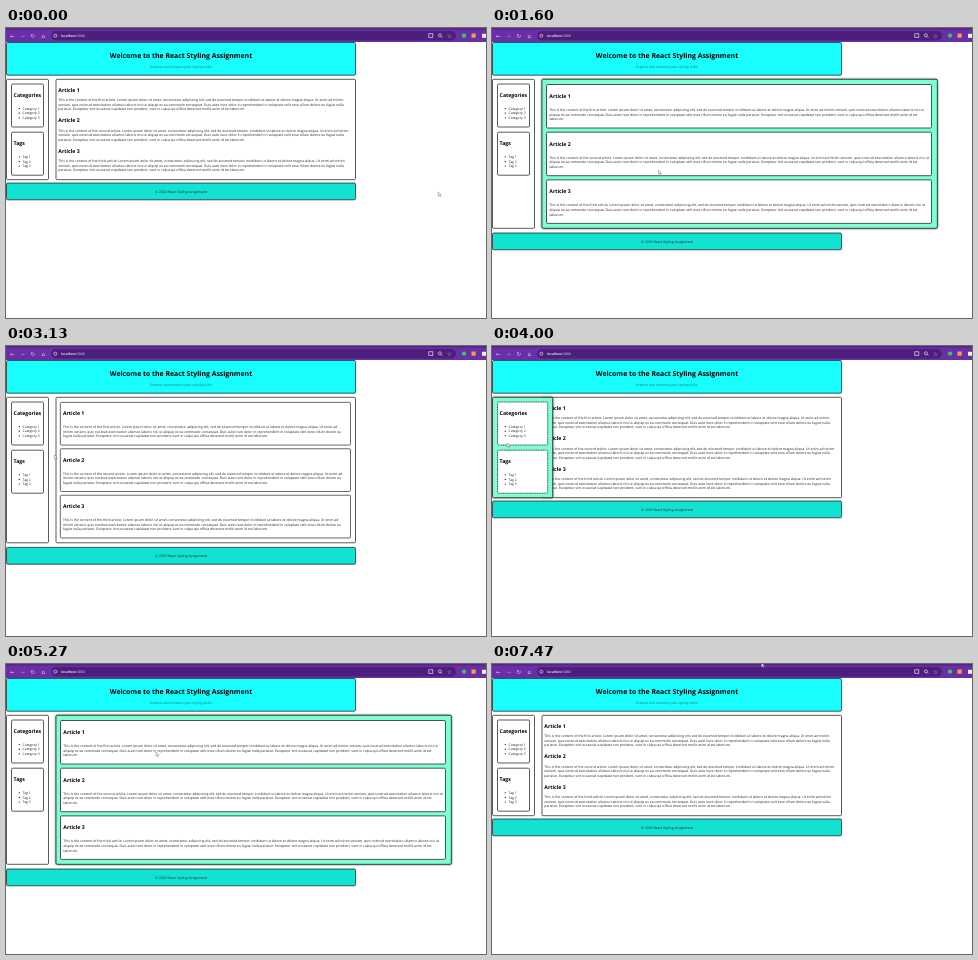
Recreate the animation shown at these times as an HTML page. Size 480 px wide and 290 px high, loop 7540 ms.

```html
<!DOCTYPE html>
<html lang="en">
<head>
<meta charset="utf-8">
<title>React Styling Assignment</title>
<style>
  html, body { margin: 0; width: 100%; height: 100%; overflow: hidden; background: #fff; }
  svg { display: block; width: 480px; height: 290px; }
  text { font: 3.41px "Open Sans", "Noto Sans", sans-serif; fill: #222; text-rendering: geometricPrecision; white-space: pre; }
  .h1 { font-size: 6.9px; font-weight: 700; fill: #000; }
  .h2 { font-size: 5.2px; font-weight: 700; fill: #000; }
  .mid { text-anchor: middle; }
  .icon { font: 5.5px "DejaVu Sans", sans-serif; fill: #e9dcf5; text-anchor: middle; }
  .url { font-weight: 600; fill: #fff; }
  .shadow { filter: drop-shadow(0 0 1px #000a); }
</style>
</head>
<body>
<svg viewBox="0 0 480 290">
  <rect width="480" height="14" fill="#6a2fa6"/>
  <rect width="480" height="1.6" fill="#56258a"/>
  <rect x="45" y="3" width="405" height="9.4" rx="4.7" fill="#4b1f7b"/>
  <text class="icon" x="6.2" y="9.5">←</text>
  <text class="icon" x="16.5" y="9.5" opacity=".5">→</text>
  <text class="icon" x="26.8" y="9.5">↻</text>
  <text class="icon" x="37.2" y="9.5">⌂</text>
  <text class="icon" x="443.5" y="9.5">☆</text>
  <g fill="none" stroke="#e9dcf5" stroke-width=".7">
    <circle cx="49.3" cy="7.7" r="1.5"/>
    <rect x="422.8" y="5.8" width="4" height="3.5"/>
    <path d="M435 8.400l1.300 1.300"/><circle cx="433.900" cy="7.300" r="1.500"/>
  </g>
  <text class="url" x="55" y="9">localhost<tspan fill="#c9b5dc">:3000</tspan></text>
  <circle cx="458" cy="7.600" r="2.200" fill="#35c56c"/>
  <rect x="465.500" y="5.500" width="4.200" height="4.200" fill="#f0a43a"/>
  <rect x="476" y="5.800" width="4" height="4" fill="#f4edfa"/>
  <g id="page"></g>
  <path id="cursor" d="M0 0v4l1-.8.7 1.500.7-.3-.7-1.500h1.300z" fill="#fff" stroke="#444" stroke-width=".35"/>
</svg>
<script>
const LOOP = 7540, COLLAPSE = 280;
const page = document.getElementById('page');
const cursor = document.getElementById('cursor');

const LOREM = 'Lorem ipsum dolor sit amet, consectetur adipiscing elit, sed do eiusmod tempor ' +
  'incididunt ut labore et dolore magna aliqua. Ut enim ad minim veniam, quis nostrud exercitation ' +
  'ullamco laboris nisi ut aliquip ex ea commodo consequat. Duis aute irure dolor in reprehenderit ' +
  'in voluptate velit esse cillum dolore eu fugiat nulla pariatur. Excepteur sint occaecat cupidatat ' +
  'non proident, sunt in culpa qui officia deserunt mollit anim id est laborum.';

// words that start the second and third line at each article width
const BREAKS = { base: ['veniam', 'pariatur'], padded: ['minim', 'fugiat'], wide: ['aliquip', 'laborum'] };

const MAIN_HOVER = [[1070, 3085], [5030, 6650]];
const SIDE_HOVER = [3200, 4580];

// pointer moves: start, end, destination; it rests in between
const HOME = [432.2, 164];
const MOVES = [
  [70, 530, 374, 156], [1000, 1600, 166.5, 142], [2200, 2600, 65, 115], [2930, 3530, 15, 97],
  [4330, 4630, 70, 42], [4630, 5000, 142.5, 51], [5000, 5270, 150, 88],
  [5730, 6130, 222, 140], [6130, 6530, 294, 74], [6530, 6930, 272, 6], [7270, 7470, 269.5, -1]
];

const clamp = v => Math.min(1, Math.max(0, v));
const mix = (a, b, p) => a + (b - a) * p;
const within = (t, [a, b]) => t >= a && t < b;

function pointer(t) {
  let [x, y] = HOME;
  for (const [from, to, nx, ny] of MOVES) {
    const p = clamp((t - from) / (to - from));
    x = mix(x, nx, p);
    y = mix(y, ny, p);
  }
  return [x, y];
}

// 1 while the main column is hovered, easing back to 0 after the pointer leaves
function expansion(t) {
  const last = MAIN_HOVER.filter(h => t >= h[0]).pop();
  if (!last) return 0;
  const q = clamp((t - last[1]) / COLLAPSE);
  return 1 - q * q * (3 - 2 * q);
}

const text = (x, y, s, cls = '') => `<text x="${x}" y="${y}" class="${cls}">${s}</text>`;

function box(x, y, right, bottom, fill = '#fff', extra = '') {
  return `<rect x="${x}" y="${y}" width="${right - x}" height="${bottom - y}" rx="1.2"
    fill="${fill}" stroke="#000" stroke-width=".65" ${extra}/>`;
}

function article(i, p, breaks) {
  const shift = i * mix(30.5, 47.7, p);
  const top = mix(54, 56.5, p) + shift, x = mix(52.3, 57.3, p);
  const right = breaks === BREAKS.wide ? 439.5 : mix(347, 344.3, p);
  const title = mix(63.9, 69.9, p) + shift;
  let body = `This is the content of the ${['first', 'second', 'third'][i]} article. ${LOREM}`;
  for (const word of breaks) body = body.replace(' ' + word, '\n' + word);
  return (p ? box(mix(52, 54.5, p), top, right, top + mix(33, 43.5, p), '#fff', `stroke-opacity="${p}"`) : '') +
    text(x, title, `Article ${i + 1}`, 'h2') +
    body.split('\n').map((s, n) => text(x, title + mix(9.3, 13.1, p) + n * 4.55, s)).join('');
}

function card(y, right, title, item, dash) {
  let out = box(5.5, y, right, y + 43, '#fff', dash) + text(7.6, y + 12.7, title, 'h2');
  for (let n = 0; n < 3; n++) {
    const base = y + 25.7 + n * 4.6;
    out += `<circle cx="13.3" cy="${base - 1.1}" r=".6"/>` + text(16.6, base, `${item} ${n + 1}`);
  }
  return out;
}

function draw(t) {
  const p = expansion(t);
  const wide = MAIN_HOVER.some(h => within(t, h)), side = within(t, SIDE_HOVER);
  const bottom = mix(151.7, 200.3, p), foot = mix(155, 205, p);
  const breaks = wide ? BREAKS.wide : p > .5 ? BREAKS.padded : BREAKS.base;
  const hover = on => on ? 'class="shadow"' : '';
  const tone = on => on ? '#7fffd0' : '#fff';
  const dash = side ? 'stroke-dasharray="1.2 .5"' : '';
  const cardRight = side ? 55.7 : 37.5;

  page.innerHTML =
    box(.5, 14.5, 349.5, 47.2, '#18fdfd') +
    text(175, 29.5, 'Welcome to the React Styling Assignment', 'h1 mid') +
    text(175, 40.4, '<tspan fill="#087f80">Explore and enhance your styling skills!</tspan>', 'mid') +
    box(50, 51.3, wide ? 445.3 : 349.5, bottom, tone(wide), hover(wide)) +
    [0, 1, 2].map(i => article(i, p, breaks)).join('') +
    box(.5, 51.3, side ? 60.7 : 42.5, bottom, tone(side), hover(side)) +
    card(56, cardRight, 'Categories', 'Category', dash) +
    card(104.2, cardRight, 'Tags', 'Tag', dash) +
    box(.5, foot, 349.5, foot + 16.8, '#12e2d2') +
    text(175, foot + 9.6, '© 2023 React Styling Assignment', 'mid');

  cursor.setAttribute('transform', `translate(${pointer(t)})`);
}

const start = performance.now();
function tick() {
  draw((performance.now() - start) % LOOP);
  requestAnimationFrame(tick);
}
tick();
</script>
</body>
</html>
```
